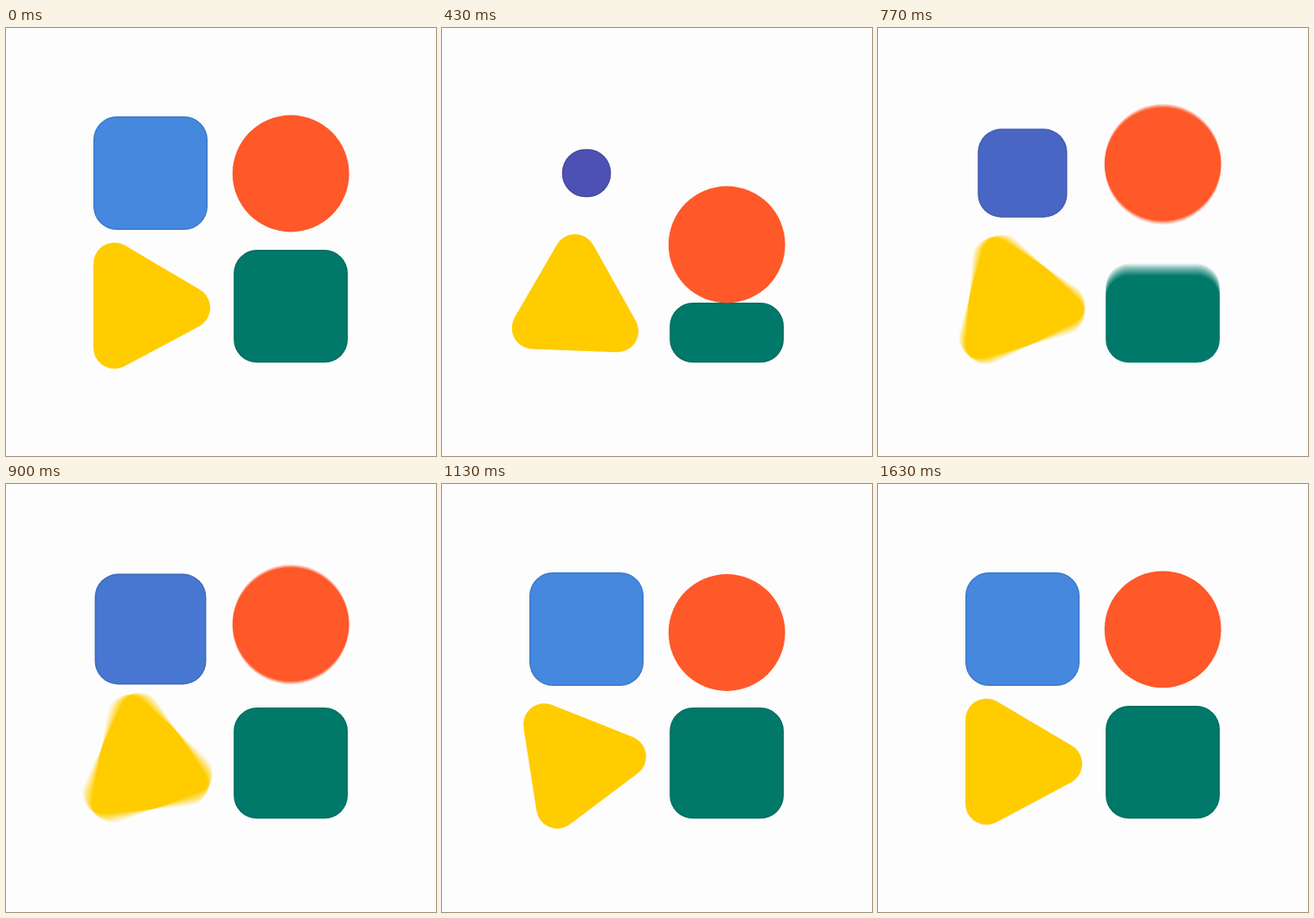
An HTML page with a canvas for the animation above (1660 ms loop, 497 by 494 pixels).

```html
<!DOCTYPE html>
<html lang="en">
<head>
<meta charset="utf-8">
<title>Four shapes</title>
<style>
  html, body { margin: 0; width: 100%; height: 100%; overflow: hidden; background: #fdfdfd; }
  canvas { display: block; width: 497px; height: 494px; }
</style>
</head>
<body>
<canvas id="stage"></canvas>
<script>
const W = 497, H = 494, LOOP = 1660, STEP = 100 / 3, STEPS = 50;
const SHUTTER = 0.5, SAMPLES = 15;
const dpr = window.devicePixelRatio || 1;

function surface(canvas) {
  canvas.width = Math.round(W * dpr);
  canvas.height = Math.round(H * dpr);
  const ctx = canvas.getContext('2d');
  ctx.scale(dpr, dpr);
  return ctx;
}
const stage = surface(document.getElementById('stage'));
const layer = surface(document.createElement('canvas'));

// Ease in and out from 0 to 1 between two steps; a higher power is sharper.
const ease = (start, end, power) => n => {
  const u = Math.min(1, Math.max(0, (n - start) / (end - start)));
  return u < 0.5 ? (2 * u) ** power / 2 : 1 - (2 - 2 * u) ** power / 2;
};

const press = ease(0.8, 12.8, 5), release = ease(16.7, 28.7, 8);
const rise = ease(16.4, 25.4, 3), drop = ease(24.3, 29.3, 2), settle = ease(34, 44, 2);
const shrink = ease(1.8, 15.8, 3), grow = ease(15, 29, 2);
const darken = ease(0, 13, 1), lighten = ease(18, 31, 1);
const drift = ease(0, 41, 2), whirl = ease(16.6, 34.9, 3);

const squareHalf = n => 66 - 39 * (shrink(n) - grow(n));
const ballY = n => 168 + 82 * press(n) - 100.7 * rise(n) + 22.2 * drop(n) - 3.7 * settle(n);
const blockTop = n => 256 + 61 * press(n) - 59 * release(n) - 2 * settle(n);
const spin = n => 150 * drift(n) + 210 * whirl(n);

const LIGHT = [69, 136, 222], DEEP = [77, 81, 180];
function squareColor(n) {
  const k = darken(n) - lighten(n);
  return `rgb(${LIGHT.map((c, i) => Math.round(c + (DEEP[i] - c) * k))})`;
}

const CORNERS = [[125.3, 272], [211.7, 323], [125.3, 369]];
const PIVOT = [157.4, 319.9], ROUND = 24.3;

function box(ctx, x, y, w, h) {
  const r = Math.min(27, w / 2, h / 2);
  ctx.moveTo(x + r, y);
  ctx.arcTo(x + w, y, x + w, y + h, r);
  ctx.arcTo(x + w, y + h, x, y + h, r);
  ctx.arcTo(x, y + h, x, y, r);
  ctx.arcTo(x, y, x + w, y, r);
  ctx.closePath();
}

function triangle(ctx, degrees) {
  ctx.translate(...PIVOT);
  ctx.rotate(degrees * Math.PI / 180);
  ctx.translate(-PIVOT[0], -PIVOT[1]);
  const normal = (p, q) => Math.atan2(q[1] - p[1], q[0] - p[0]) - Math.PI / 2;
  CORNERS.forEach((p, i) => {
    const prev = CORNERS[(i + 2) % 3], next = CORNERS[(i + 1) % 3];
    ctx.arc(p[0], p[1], ROUND, normal(prev, p), normal(p, next));
  });
  ctx.closePath();
}

// blur: smallest travel within the shutter that smears the shape
const shapes = [
  {
    color: squareColor, value: squareHalf, blur: Infinity, rim: true,
    path: (ctx, r) => box(ctx, 167 - r, 168 - r, 2 * r, 2 * r - 1)
  },
  {
    color: () => '#ffcc00', value: spin, blur: 4,
    path: triangle
  },
  {
    color: () => '#00796b', value: blockTop, blur: 1.5, rim: true,
    path: (ctx, top) => box(ctx, 263.2, top, 131.8, 386.3 - top)
  },
  {
    color: () => '#ff5829', value: ballY, blur: 1.5,
    path: (ctx, y) => ctx.arc(329.2, y, 67.4, 0, 2 * Math.PI)
  }
];

function fillShape(ctx, shape, value) {
  ctx.save();
  ctx.beginPath();
  shape.path(ctx, value);
  ctx.fill();
  ctx.restore();
}

function drawSharp(shape, n) {
  stage.fillStyle = shape.color(n);
  fillShape(stage, shape, shape.value(n));
  if (!shape.rim) return;
  stage.save();
  stage.beginPath();
  shape.path(stage, shape.value(n));
  stage.clip();
  stage.strokeStyle = 'rgba(0, 0, 0, 0.1)';
  stage.lineWidth = 3;
  stage.stroke();
  stage.restore();
}

function drawBlurred(shape, n) {
  layer.globalCompositeOperation = 'source-over';
  layer.clearRect(0, 0, W, H);
  layer.globalCompositeOperation = 'lighter';
  layer.globalAlpha = 1 / SAMPLES;
  layer.fillStyle = '#fff';
  for (let i = 0; i < SAMPLES; i++) {
    const offset = (i / (SAMPLES - 1) - 0.5) * SHUTTER;
    fillShape(layer, shape, shape.value(n + offset));
  }
  layer.globalCompositeOperation = 'source-in';
  layer.globalAlpha = 1;
  layer.fillStyle = shape.color(n);
  layer.fillRect(0, 0, W, H);
  stage.drawImage(layer.canvas, 0, 0, W, H);
}

function draw(n) {
  stage.fillStyle = '#fdfdfd';
  stage.fillRect(0, 0, W, H);
  for (const shape of shapes) {
    const travel = Math.abs(shape.value(n + SHUTTER / 2) - shape.value(n - SHUTTER / 2));
    (travel > shape.blur ? drawBlurred : drawSharp)(shape, n);
  }
}

const begin = performance.now();
function tick() {
  const t = (performance.now() - begin) % LOOP;
  draw(Math.min(STEPS - 1, Math.floor((t + 3.4) / STEP)));
  requestAnimationFrame(tick);
}
tick();
</script>
</body>
</html>
```
